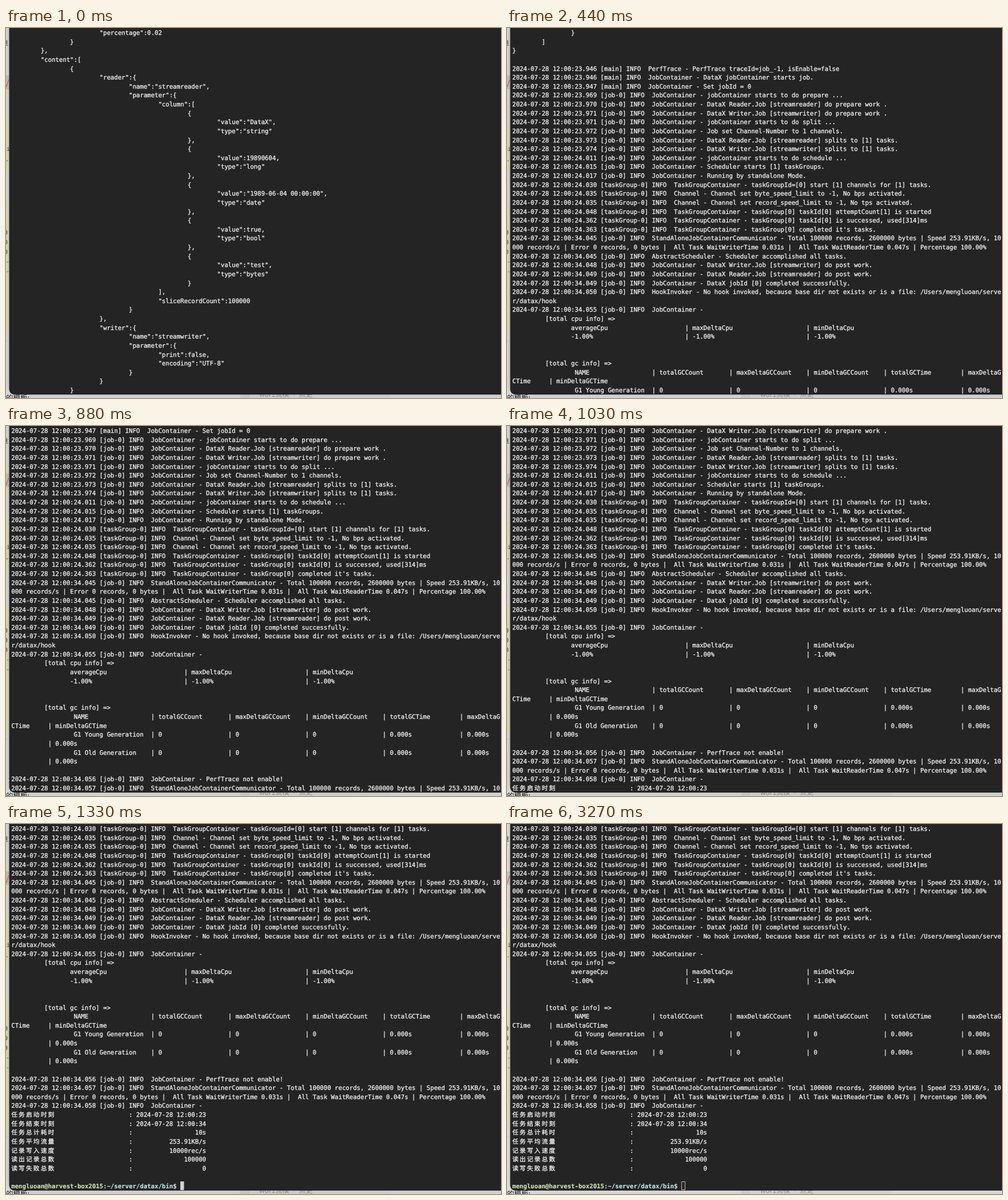
Write an HTML page with a canvas that moves like this. It is 866 px wide and 647 px high and loops after 3.29 s.

```html
<!DOCTYPE html>
<html lang="en">
<head>
<meta charset="utf-8">
<title>Terminal scrollback</title>
<style>
  html, body { margin: 0; width: 100%; height: 100%; overflow: hidden; background: #ddd; }
  canvas { display: block; }
</style>
</head>
<body>
<canvas id="stage" width="866" height="647"></canvas>
<script>
const ctx = document.getElementById('stage').getContext('2d');

const LOOP = 3290;
const COLUMNS = 133, ROWS = 41;
const CELL = 6.43, PITCH = 15.625, LEFT = 9.2, BASELINE = 12;
const SIZE = 10.8;
const MONO = '"DejaVu Sans Mono", "Noto Sans CJK SC", "Noto Sans CJK", monospace';
const SANS = '"Noto Sans CJK SC", "Noto Sans CJK", sans-serif';

const USER = 'mengluoan', HOST = 'harvest-box2015', CWD = '~/server/datax/bin';

// [time in ms, first visible line]
const SCROLL = [[0, 0], [140, 5], [290, 25], [440, 40], [590, 43], [730, 44],
                [880, 46], [1030, 49], [1180, 53], [1330, 57]];
// [time in ms, pointer centre or nothing]
const POINTER = [[0, null], [2670, [862, 637]], [2820, [857, 646]], [2970, null]];
const BLUR_TIME = 3270;

function configLines() {
  const column = [['DataX', 'string'], [19890604, 'long'], ['1989-06-04 00:00:00', 'date'],
                  [true, 'bool'], ['test', 'bytes']].map(([value, type]) => ({ value, type }));
  const config = {
    setting: { errorLimit: { percentage: 0.02 } },
    content: [{
      reader: { name: 'streamreader', parameter: { column, sliceRecordCount: 100000 } },
      writer: { name: 'streamwriter', parameter: { print: false, encoding: 'UTF-8' } }
    }]
  };
  return JSON.stringify(config, null, 8).replace(/": /g, '":').split('\n').slice(3);
}

const log = (time, thread, text) => `2024-07-28 12:00:${time} [${thread}] INFO  ${text}`;
const job = (time, text) => log(time, 'job-0', text);
const container = (time, text) => job(time, 'JobContainer - ' + text);
const task = (time, text) => log(time, 'taskGroup-0', text);

const table = (indent, widths, cells) =>
  ' '.repeat(indent) + cells.map((cell, i) => cell.padEnd(widths[i])).join(' | ');
const cpuRow = (...cells) => table(16, [30, 30, 30], cells);
const gcRow = (...cells) => table(17, [20, 18, 18, 18, 18, 18, 18], cells);
const gcStats = name => gcRow(name, '0', '0', '0', '0.000s', '0.000s', '0.000s');
const summary = (label, value) => label + ' '.repeat(20) + ': ' + value.padStart(19);

const totals = 'StandAloneJobContainerCommunicator - Total 100000 records, 2600000 bytes | ' +
  'Speed 253.91KB/s, 10000 records/s | Error 0 records, 0 bytes |  ' +
  'All Task WaitWriterTime 0.031s |  All Task WaitReaderTime 0.047s | Percentage 100.00%';

const wrap = line => line.match(new RegExp(`.{1,${COLUMNS}}`, 'g')) || [''];

const lines = [
  ...configLines(),
  '',
  log('23.946', 'main', 'PerfTrace - PerfTrace traceId=job_-1, isEnable=false'),
  log('23.946', 'main', 'JobContainer - DataX jobContainer starts job.'),
  log('23.947', 'main', 'JobContainer - Set jobId = 0'),
  container('23.969', 'jobContainer starts to do prepare ...'),
  container('23.970', 'DataX Reader.Job [streamreader] do prepare work .'),
  container('23.971', 'DataX Writer.Job [streamwriter] do prepare work .'),
  container('23.971', 'jobContainer starts to do split ...'),
  container('23.972', 'Job set Channel-Number to 1 channels.'),
  container('23.973', 'DataX Reader.Job [streamreader] splits to [1] tasks.'),
  container('23.974', 'DataX Writer.Job [streamwriter] splits to [1] tasks.'),
  container('24.011', 'jobContainer starts to do schedule ...'),
  container('24.015', 'Scheduler starts [1] taskGroups.'),
  container('24.017', 'Running by standalone Mode.'),
  task('24.030', 'TaskGroupContainer - taskGroupId=[0] start [1] channels for [1] tasks.'),
  task('24.035', 'Channel - Channel set byte_speed_limit to -1, No bps activated.'),
  task('24.035', 'Channel - Channel set record_speed_limit to -1, No tps activated.'),
  task('24.048', 'TaskGroupContainer - taskGroup[0] taskId[0] attemptCount[1] is started'),
  task('24.362', 'TaskGroupContainer - taskGroup[0] taskId[0] is successed, used[314]ms'),
  task('24.363', "TaskGroupContainer - taskGroup[0] completed it's tasks."),
  job('34.045', totals),
  job('34.045', 'AbstractScheduler - Scheduler accomplished all tasks.'),
  container('34.048', 'DataX Writer.Job [streamwriter] do post work.'),
  container('34.049', 'DataX Reader.Job [streamreader] do post work.'),
  container('34.049', 'DataX jobId [0] completed successfully.'),
  job('34.050', 'HookInvoker - No hook invoked, because base dir not exists or is a file: ' +
    `/Users/${USER}/server/datax/hook`),
  container('34.055', ''),
  '         [total cpu info] =>',
  cpuRow('averageCpu', 'maxDeltaCpu', 'minDeltaCpu'),
  cpuRow('-1.00%', '-1.00%', '-1.00%'),
  '',
  '',
  '         [total gc info] =>',
  gcRow('NAME', 'totalGCCount', 'maxDeltaGCCount', 'minDeltaGCCount',
    'totalGCTime', 'maxDeltaGCTime', 'minDeltaGCTime'),
  gcStats('G1 Young Generation'),
  gcStats('G1 Old Generation'),
  '',
  job('34.056', 'JobContainer - PerfTrace not enable!'),
  job('34.057', totals),
  container('34.058', ''),
  summary('任务启动时刻', '2024-07-28 12:00:23'),
  summary('任务结束时刻', '2024-07-28 12:00:34'),
  summary('任务总计耗时', '10s'),
  summary('任务平均流量', '253.91KB/s'),
  summary('记录写入速度', '10000rec/s'),
  summary('读出记录总数', '100000'),
  summary('读写失败总数', '0'),
  ''
].flatMap(wrap);
const promptLine = lines.length;

function box(color, x, y, w, h) {
  ctx.fillStyle = color;
  ctx.fillRect(x, y, w, h);
}

function label(text, x, y, color, size = 11, family = SANS) {
  ctx.font = `${size}px ${family}`;
  ctx.fillStyle = color;
  ctx.fillText(text, x, y);
}

// Writes on the character grid; wide characters take two cells.
// A hairline outline gives the strokes their smoothed, slightly heavy look.
function write(text, row, col = 0, color = '#f2f2f2', weight = 'normal') {
  ctx.font = `${weight} ${SIZE}px ${MONO}`;
  ctx.fillStyle = ctx.strokeStyle = color;
  ctx.lineWidth = weight === 'bold' ? 0.1 : 0.3;
  for (const char of text) {
    const x = LEFT + col * CELL, y = BASELINE + row * PITCH;
    if (char !== ' ') {
      ctx.fillText(char, x, y);
      ctx.strokeText(char, x, y);
    }
    col += char > '\u2e80' ? 2 : 1;
  }
  return col;
}

function drawDesktop() {
  box('#e9e9e9', 0, 0, 866, 647);
  box('#d2d2d2', 0, 83, 8, 24);
  box('#eee8d0', 0, 166, 8, 85);
  box('#eee8d0', 0, 311, 8, 224);
  box('#d8d8d8', 0, 547, 8, 1);
  box('#dcdcdc', 410, 636, 16, 11);
  box('#e4e4e4', 426, 636, 247, 11);
  label('竟', -7, 30, '#444');
  label('/', 0, 101, '#d33', 13);
  label('ai', -5, 215, '#444', 10, MONO);
  label('.', -1, 233, '#444', 10, MONO);
  [357, 374, 391].forEach(y => label('0', -3, y + 4, '#444', 10, MONO));
  [408, 425].forEach(y => label('1-', -6, y + 4, '#2a6fa8', 10, MONO));
  label('的模板:', 0, 651, '#222', 12.5);
  label('wor1流模 · 点更', 443, 645, '#999', 12);
}

function drawWindow(focused) {
  ctx.save();
  ctx.shadowColor = focused ? 'rgba(0,0,0,.3)' : 'rgba(0,0,0,.22)';
  ctx.shadowBlur = 20;
  ctx.fillStyle = '#242424';
  ctx.beginPath();
  ctx.roundRect(5.5, -40, 900, 681, 9);
  ctx.fill();
  ctx.restore();
}

function drawPrompt(row, focused) {
  let col = write(`${USER}@${HOST}`, row, 0, '#cfe6b8', 'bold');
  col = write(':', row, col);
  col = write(CWD, row, col, '#bfe6ea', 'bold');
  col = write('$ ', row, col);
  const x = LEFT + col * CELL, y = BASELINE + row * PITCH - 12;
  if (focused) {
    box('#d2d2d2', x, y, CELL, PITCH - 0.5);
  } else {
    ctx.strokeStyle = '#c4bfb2';
    ctx.lineWidth = 1;
    ctx.strokeRect(Math.round(x) + 0.5, y + 0.5, 6, 14);
  }
}

function drawPointer([x, y]) {
  const beam = new Path2D(`M${x - 3} ${y - 7}q3 0 3 2.5v9q0 2.5 -3 2.5` +
    `M${x + 3} ${y - 7}q-3 0 -3 2.5v9q0 2.5 3 2.5M${x - 2} ${y + 2}h4`);
  for (const [color, width] of [['#eee', 2.6], ['#111', 1]]) {
    ctx.strokeStyle = color;
    ctx.lineWidth = width;
    ctx.stroke(beam);
  }
}

const valueAt = (steps, time) => steps.findLast(([start]) => start <= time)[1];

function draw(first, pointer, focused) {
  drawDesktop();
  drawWindow(focused);
  lines.slice(first, first + ROWS).forEach((line, row) => write(line, row));
  if (promptLine < first + ROWS) drawPrompt(promptLine - first, focused);
  if (pointer) drawPointer(pointer);
}

const start = performance.now();
let shown = '';

function tick() {
  const time = (performance.now() - start) % LOOP;
  const state = [valueAt(SCROLL, time), valueAt(POINTER, time), time < BLUR_TIME];
  const key = JSON.stringify(state);
  if (key !== shown) {
    draw(...state);
    shown = key;
  }
  requestAnimationFrame(tick);
}

ctx.textRendering = 'geometricPrecision';
ctx.lineJoin = 'round';
tick();
</script>
</body>
</html>
```
